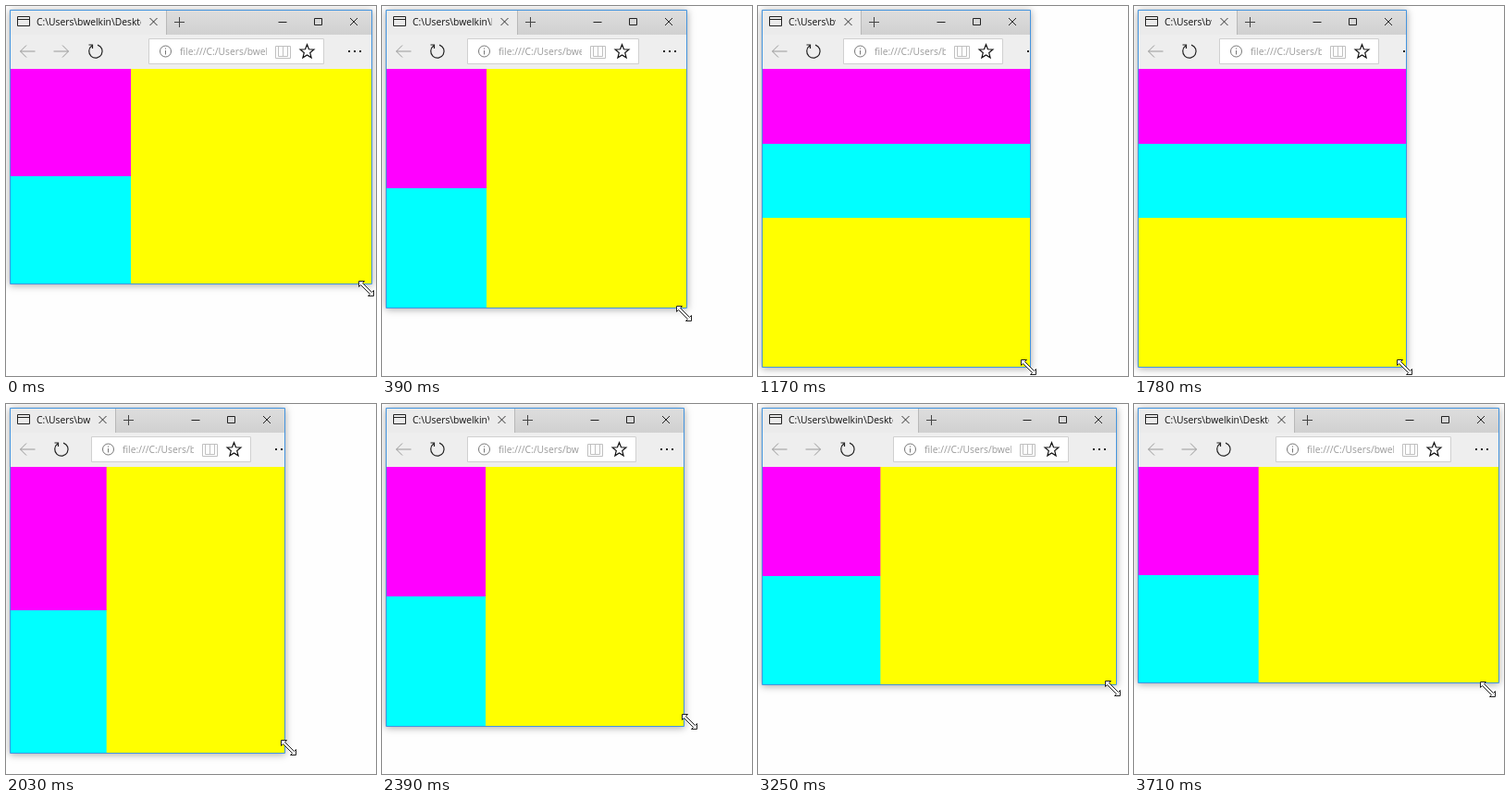
Animation of 400x400 px, one loop 3.75 s. Source, as an HTML page with a canvas:

```html
<!DOCTYPE html>
<html>
<head>
<meta charset="utf-8">
<style>
  html, body { margin: 0; height: 100%; overflow: hidden; background: #fefefe; }
  canvas { display: block; width: 400px; height: 400px; }
</style>
</head>
<body>
<canvas id="stage"></canvas>
<script>
const LOOP = 3750;
const USER = 'bwelkin';
const FONT = '10.3px "Open Sans", "Noto Sans", sans-serif';

// time, window right, window bottom, pointer x, pointer y
const KEYS = [
  [30, 396, 300, 388.5, 305],
  [530, 309, 339, 306, 345],
  [820, 298, 361, 294, 368],
  [1070, 295, 387, 292, 387],
  [1170, 295, 390, 292, 390],
  [1750, 295, 390, 292, 390],
  [2030, 302, 377, 305, 371],
  [2280, 318, 357, 323, 352],
  [2390, 327, 348, 332, 343],
  [2820, 362, 322, 366, 315],
  [2890, 368, 318, 372, 312],
  [3350, 391, 302, 384, 307],
  [3710, 395, 301, 382, 308]
];

const canvas = document.getElementById('stage');
const ctx = canvas.getContext('2d');
const dpr = window.devicePixelRatio || 1;
canvas.width = canvas.height = 400 * dpr;

const secant = (i, c) => (KEYS[i + 1][c] - KEYS[i][c]) / (KEYS[i + 1][0] - KEYS[i][0]);

function slope(i, c) {
  if (i === 0 || i === KEYS.length - 1) return 0;
  const a = secant(i - 1, c), b = secant(i, c);
  return a * b <= 0 ? 0 : 2 * a * b / (a + b);
}

// Monotone cubic through the keys
function valueAt(t, c) {
  const last = KEYS.length - 1;
  if (t <= KEYS[0][0]) return KEYS[0][c];
  if (t >= KEYS[last][0]) return KEYS[last][c];
  const i = KEYS.findIndex(k => k[0] > t) - 1;
  const a = KEYS[i], b = KEYS[i + 1], span = b[0] - a[0];
  const u = (t - a[0]) / span, v = 1 - u;
  return a[c] * (1 + 2 * u) * v * v + b[c] * u * u * (3 - 2 * u)
    + span * (slope(i, c) * u * v * v - slope(i + 1, c) * u * u * v);
}

function rect(color, x, y, w, h) {
  ctx.fillStyle = color;
  ctx.fillRect(x, y, w, h);
}

function icon(x, y, d, color = '#222', width = 1, fill) {
  const path = new Path2D(d);
  ctx.save();
  ctx.translate(x, y);
  if (fill) {
    ctx.fillStyle = fill;
    ctx.fill(path);
  }
  ctx.strokeStyle = color;
  ctx.lineWidth = width;
  ctx.stroke(path);
  ctx.restore();
}

function label(text, x, y, right, color) {
  ctx.save();
  ctx.beginPath();
  ctx.rect(x, y - 14, right - x, 20);
  ctx.clip();
  ctx.font = FONT;
  ctx.fillStyle = color;
  ctx.fillText(text, x, y);
  ctx.restore();
}

const CROSS = 'M-4 -4L4 4M4 -4L-4 4';
const STAR = 'M' + Array.from({ length: 10 }, (_, i) => {
  const r = i % 2 ? 3.4 : 7.8, a = (i / 5 - 0.5) * Math.PI;
  return (r * Math.cos(a)).toFixed(2) + ' ' + (r * Math.sin(a)).toFixed(2);
}).join('L') + 'Z';

function drawTitleBar(right) {
  const tab = Math.min(173, right - 184);
  const shade = ctx.createLinearGradient(0, 4, 0, 31);
  shade.addColorStop(0, '#dedede');
  shade.addColorStop(1, '#d0d0d0');
  rect(shade, 5, 5, right - 5, 26);
  rect('#ebebeb', 5, 5, tab - 5, 26);
  rect('#b8b8b8', tab, 5, 1, 26);
  icon(12.5, 11.5, 'M0 0H13V10H0ZM0 3H13');
  label('C:\\Users\\' + USER + '\\Desktop', 33, 21, tab - 27, '#111');
  icon(tab - 13.5, 17, CROSS, '#333');
  icon(tab + 14.5, 17.5, 'M-5.5 0H5.5M0 -5.5V5.5', '#444');
  icon(right - 97, 17.5, 'M-4.5 0H4.5');
  icon(right - 58.5, 17.5, 'M-4 -4H4V3H-4Z');
  icon(right - 20, 17, CROSS);
}

function drawToolbar(edge) {
  const boxLeft = Math.max(93, edge - 241);
  const boxRight = edge - 52;
  const refresh = Math.min(97, boxLeft - 33);
  rect('#eeeeee', 5, 31, edge - 5, 37);
  icon(15, 49, 'M16.5 0H.5M7 -6.5L.5 0L7 6.5', '#999');
  if (refresh >= 97) icon(68, 49, 'M-16.5 0H-.5M-7 -6.5L-.5 0L-7 6.5', '#999');
  icon(refresh, 49, 'M2 -6.9A7.2 7.2 0 1 1 -4.2 -5.9M-7.5 -7H-3.5V-3', '#222', 1.2);

  rect('#ffffff', boxLeft, 35, boxRight - boxLeft, 27);
  icon(boxLeft - .5, 35.5, `M0 0H${boxRight - boxLeft}V27H0Z`, '#d0d0d0');
  icon(boxLeft + 17.5, 49, 'M6 0A6 6 0 1 1 -6 0A6 6 0 1 1 6 0M0 -1V3.5M0 -3.5V-2.3', '#777');
  label('file:///C:/Users/' + USER + '/Desktop', boxLeft + 33, 53, boxRight - 62, '#999');
  icon(boxRight - 44.5, 49.5, 'M-8 -6H8V7H-8ZM-5 -6V5H5V-6M0 -6V5', '#c0c0c0');
  icon(boxRight - 18.5, 49.5, STAR, '#111', 1.2);
  for (const dx of [-6, 0, 6]) rect('#222', edge - 20 + dx, 48, 2, 2);
}

function drawPage(width, right, bottom) {
  const h = bottom - 68, half = Math.round(h / 2);
  rect('#ffff00', 5, 68, right - 5, h);
  if (h >= width) {
    rect('#00ffff', 5, 68, right - 5, half);
    rect('#ff00ff', 5, 68, right - 5, Math.round(h / 4));
  } else {
    rect('#00ffff', 5, 68 + half, width / 3, h - half);
    rect('#ff00ff', 5, 68, width / 3, half);
  }
}

function draw(t) {
  const [right, bottom, px, py] = [1, 2, 3, 4].map(c => Math.round(valueAt(t, c)));
  const edge = Math.max(right, 317);
  ctx.setTransform(dpr, 0, 0, dpr, 0, 0);
  rect('#fefefe', 0, 0, 400, 400);

  ctx.save();
  ctx.shadowColor = 'rgba(0,0,0,.35)';
  ctx.shadowBlur = 8 * dpr;
  ctx.shadowOffsetY = dpr;
  rect('#eeeeee', 4, 4, right - 4, bottom - 3);
  ctx.restore();

  ctx.save();
  ctx.beginPath();
  ctx.rect(4, 4, right - 4, bottom - 4);
  ctx.clip();
  drawTitleBar(right);
  drawToolbar(edge);
  drawPage(edge - 6, right, bottom);
  ctx.restore();

  icon(4.5, 4.5, `M0 0H${right - 5}V${bottom - 4}H0Z`, '#4494de');
  icon(px + .5, py + .5, 'M-8 -8H-2L-4 -6L6 4L8 2V8H2L4 6L-6 -4L-8 -2Z', '#222', 1, '#fff');
}

function frame() {
  draw(performance.now() % LOOP);
  requestAnimationFrame(frame);
}
frame();
</script>
</body>
</html>
```
